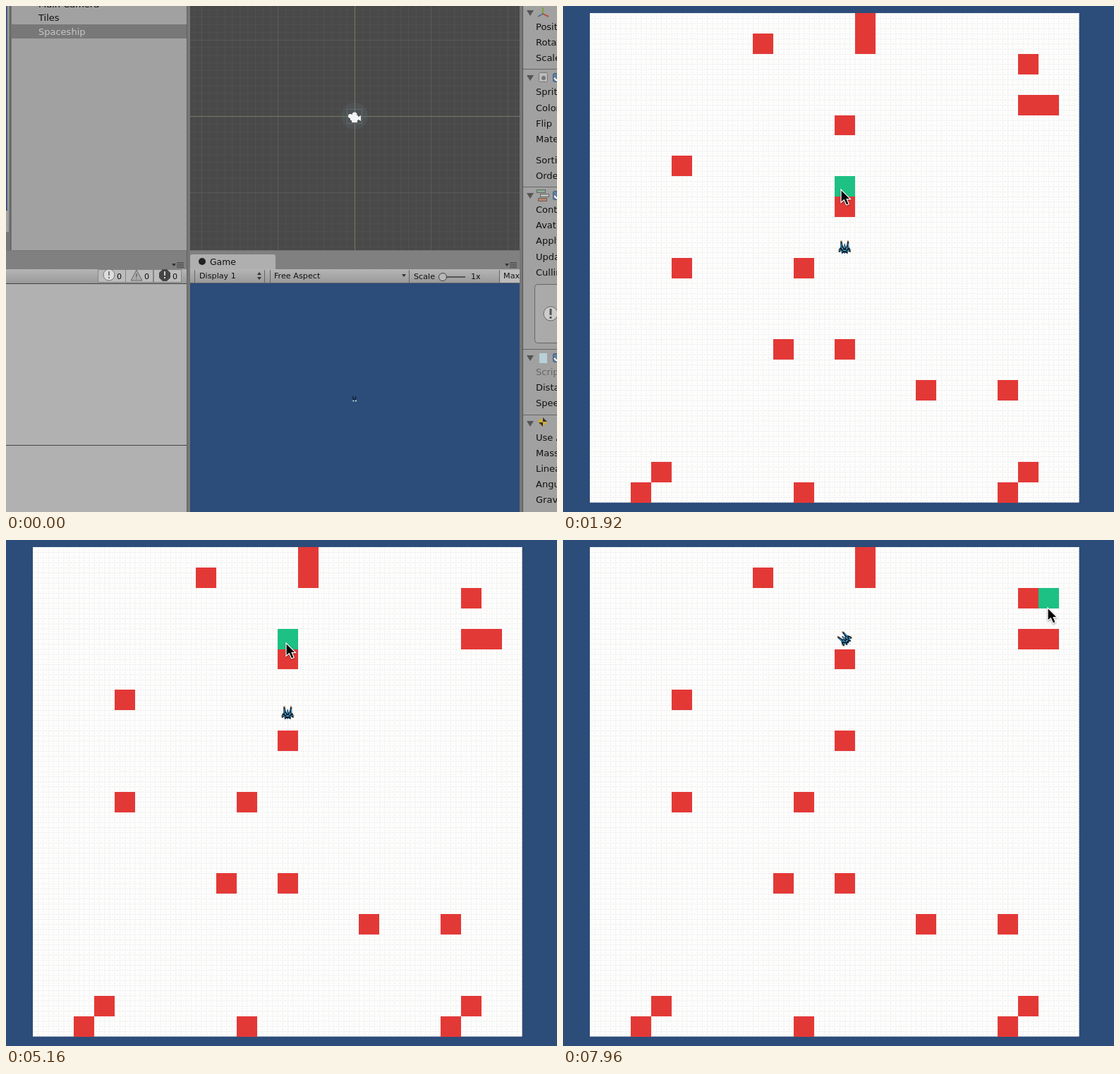
Write an HTML page that moves like this. It is 781 px wide and 717 px high and loops after 8000 ms.

```html
<!DOCTYPE html>
<html lang="en">
<head>
<meta charset="utf-8">
<title>Spaceship on a grid</title>
<style>
html, body { margin: 0; width: 100%; height: 100%; overflow: hidden; background: #2c4c79; }
svg { display: block; width: 781px; height: 717px; }
text { font-family: "DejaVu Sans", sans-serif; font-size: 13px; fill: #111; }
.small { font-size: 11.2px; }
.tab { font-size: 12.4px; }
#board { shape-rendering: crispEdges; }
</style>
</head>
<body>
<svg viewBox="0 0 781 717">
  <defs>
    <linearGradient id="bar" x2="0" y2="1"><stop stop-color="#b5b5b5"/><stop offset="1" stop-color="#999"/></linearGradient>
    <pattern id="boardLines" width="7.22" height="7.22" patternUnits="userSpaceOnUse" x="38" y="10">
      <path d="M0 .5H7.22" stroke="#e6e6f2" stroke-dasharray="2 1.61"/>
      <path d="M.5 0V7.22" stroke="#ecece0" stroke-dasharray="2 1.61"/>
    </pattern>
    <pattern id="sceneLines" width="10.85" height="10.85" patternUnits="userSpaceOnUse" x="494" y="156">
      <path d="M0 .5H10.85M.5 0V10.85" stroke="#505050"/>
    </pattern>
    <g id="shipArt">
      <path d="M-1-3L0-6L1-3L2 0L3-4L4-10L6-9L6-1L9 4L8 7L5 5L4 9L1 7L0 9L-1 7L-4 9L-5 5L-8 7L-9 4L-6-1L-6-9L-4-10L-3-4L-2 0Z" fill="#0b1a2c"/>
      <path d="M-5-6V1M5-6V1M-7 3L-3 6M7 3L3 6" stroke="#2b8fc2" stroke-width="1.5" fill="none"/>
      <path d="M0-3V1M-2 4H2M-3 0V3M3 0V3" stroke="#63bcd8" stroke-width="1.3"/>
      <path d="M-5-10V-8M5-10V-8M-8.500 3V5M8.500 3V5" stroke="#e0a048" stroke-width="1.5"/>
      <path d="M-4 9V11M0 9V12M4 9V11" stroke="#bfeee4"/>
    </g>
  </defs>

  <g id="editor">
    <rect width="781" height="717" fill="#777"/>
    <rect width="4" height="320" fill="#a1a1a1"/>
    <path d="M1 0V290" stroke="#3d5680" stroke-width="2"/>
    <rect x="8" width="248" height="346" fill="#a1a1a1"/>
    <rect x="8" y="26" width="248" height="20" fill="#787878"/>
    <rect y="347" width="256" height="26" fill="#808080"/>
    <rect y="373" width="256" height="20" fill="url(#bar)"/>
    <rect y="393" width="256" height="324" fill="#b1b1b1"/>
    <path d="M0 393.500H256M0 622.500H256" stroke="#444"/>
    <path d="M6.500 0V346M256.500 0V717" stroke="#606060"/>
    <g fill="#bcbcbc" stroke="#858585">
      <rect x="130.500" y="373.500" width="39" height="18"/><rect x="169.500" y="373.500" width="39" height="18"/><rect x="209.500" y="373.500" width="39" height="18"/>
    </g>
    <circle cx="146" cy="381" r="8" fill="#ddd" stroke="#777"/>
    <path d="M177 389L185 374L193 389Z" fill="#aaa" stroke="#666"/>
    <path d="M222 373H228L233 378V385L228 390H222L217 385V378Z" fill="#444"/>
    <path d="M146 376V382M146 384V386M185 379V384M185 386V387" stroke="#777" stroke-width="2"/>
    <path d="M225 376V382M225 384V386" stroke="#ccc" stroke-width="2"/>

    <rect x="261" width="467" height="346" fill="#494949"/>
    <rect x="261" width="467" height="346" fill="url(#sceneLines)"/>
    <path d="M277.500 0V346M385.500 0V346M602.500 0V346M711.500 0V346M261 48.500H728M261 264.500H728" stroke="#585858"/>
    <path d="M494.500 0V346M261 156.500H728" stroke="#777868"/>
    <circle cx="494" cy="156" r="19" fill="#677878" opacity=".2"/>
    <rect x="483.500" y="146.500" width="21" height="20" fill="none" stroke="#5c6b72"/>
    <g fill="#f4f4f4"><circle cx="494" cy="154" r="3.500"/><circle cx="488" cy="156" r="3"/><rect x="488" y="155" width="11" height="7"/><path d="M498 158L503 155V163L498 160ZM490 162H498V165H490Z"/></g>

    <rect x="261" y="347" width="467" height="26" fill="#808080"/>
    <path d="M261 373V355Q261 352 264 352H379Q382 352 382 355V373Z" fill="#afafaf"/>
    <circle cx="278" cy="362" r="5" fill="#222"/>
    <rect x="261" y="373" width="467" height="20" fill="url(#bar)"/>
    <path d="M267.500 374V392M366.500 374V392M374.500 374V392M571.500 374V392M699.500 374V392M261 392.500H728" stroke="#666"/>
    <rect x="700" y="374" width="28" height="18" fill="#bcbcbc"/>
    <path d="M356 381L359 377L362 381ZM356 384H362L359 388ZM561 380H567L564 384ZM235 365H241L238 369ZM707 365H713L710 369Z" fill="#333"/>
    <path d="M242 364H252M242 367H252M242 370H252M714 364H724M714 367H724M714 370H724" stroke="#333"/>
    <path d="M619 384H651" stroke="#555" stroke-width="2"/>
    <circle cx="619" cy="384" r="5.500" fill="#b8b8b8" stroke="#444"/>
    <rect x="261" y="393" width="467" height="324" fill="#2c4c79"/>
    <path d="M492 553V558M495.500 553V558M494 556V559" stroke="#10243c" stroke-width="1.500"/>
    <path d="M491.500 559.500H493.500M495 559.500H497" stroke="#a9dcd8" stroke-width="2"/>

    <rect x="733" width="48" height="717" fill="#a1a1a1"/>
    <path d="M733 89.500H781M733 256.500H781M733 486.500H781M733 579.500H781" stroke="#666"/>
    <path d="M732.500 0V717" stroke="#555"/>
    <g id="arrows" fill="#555"></g>
    <path d="M761 11V2" stroke="#7ca336" stroke-width="2"/><path d="M761 11L754 15" stroke="#4c7396" stroke-width="2"/><path d="M761 11L769 15" stroke="#b74e3c" stroke-width="2"/>
    <rect x="755.500" y="94.500" width="12" height="13" rx="2" fill="#bbb" stroke="#777"/><circle cx="762" cy="102" r="3" fill="#777"/>
    <g stroke="#666"><rect x="752.500" y="260.500" width="12" height="4" fill="#8aa995"/><rect x="757.500" y="266.500" width="12" height="4" fill="#bbb"/><rect x="754.500" y="272.500" width="12" height="4" fill="#bc8265"/></g>
    <rect x="756" y="492" width="11" height="14" fill="#b9d0d8"/>
    <path d="M754 589L760 583V595ZM761 584L767 590L761 595Z" fill="#d9ad28"/><path d="M761 583L767 589H761ZM755 590H761V596Z" fill="#333"/>
    <g fill="#5e7fa5" stroke="#465c75"><rect x="775.500" y="95.500" width="12" height="12" rx="2"/><rect x="775.500" y="262.500" width="12" height="12" rx="2"/><rect x="775.500" y="492.500" width="12" height="12" rx="2"/></g>
    <path d="M777 102L781 106M777 269L781 273M777 499L781 503" stroke="#fff" stroke-width="2"/>
    <rect x="749.500" y="394.500" width="50" height="83" rx="4" fill="#aaa" stroke="#666"/>
    <circle cx="772" cy="436" r="10" fill="#ccc" stroke="#666"/>
    <path d="M772 429V438M772 440V443" stroke="#555" stroke-width="3"/>
    <g id="labels"></g>
  </g>

  <g id="game">
    <rect width="781" height="717" fill="#2c4c79"/>
    <rect x="38" y="10" width="693.500" height="693.500" fill="#fdfdfd"/>
    <rect x="38" y="10" width="693.500" height="693.500" fill="url(#boardLines)"/>
    <g id="board">
      <g id="walls" fill="#e33936"></g>
      <rect id="hover" width="28.900" height="28.900" fill="#1dc184"/>
    </g>
    <use id="ship" href="#shipArt"/>
    <g id="cursor">
      <path d="M0 0V18.500L4.300 14.800L7.700 22L11.200 20.500L8.200 13.600H13.500Z" fill="#050505" stroke="#fff" stroke-width="1.200" style="filter:drop-shadow(0 1px 1px #0006)"/>
    </g>
  </g>
</svg>
<script>
const LOOP = 8000, STEP = 40, CELL = 28.9, LEFT = 38, TOP = 10, SPEED = 80;
const $ = id => document.getElementById(id);

const walls = [[13,0],[13,1],[8,1],[21,2],[21,4],[22,4],[12,5],[4,7],[12,9],
  [4,12],[10,12],[9,16],[12,16],[16,18],[20,18],[3,22],[21,22],[2,23],[10,23],[20,23]];
const corner = ([c, r]) => [LEFT + c * CELL, TOP + r * CELL];
const center = ([c, r]) => corner([c + .5, r + .5]);
$('walls').innerHTML = walls.map(cell => {
  const [x, y] = corner(cell);
  return `<rect x="${x}" y="${y}" width="${CELL}" height="${CELL}"/>`;
}).join('');

const label = (text, x, y, cls = '', fill = '#111') =>
  `<text x="${x}" y="${y}" class="${cls}" style="fill:${fill}">${text}</text>`;
const fields = { Position: 34, Rotation: 56, Scale: 78, Sprite: 126, Color: 149, Flip: 171, Material: 193,
  'Sorting Layer': 223, 'Order in Layer': 245, Controller: 293, Avatar: 315, 'Apply Root Motion': 337,
  'Update Mode': 360, 'Culling Mode': 382, Distance: 545, Speed: 567, 'Use Auto Mass': 616,
  Mass: 638, 'Linear Drag': 660, 'Angular Drag': 682, 'Gravity Scale': 704 };
$('labels').innerHTML = [
  label('Main Camera', 46, 2), label('Tiles', 46, 21), label('Spaceship', 46, 41, '', '#c8c8c8'),
  ...[157, 196, 236].map(x => label('0', x, 387, 'small')),
  label('Game', 289, 367, 'tab'), label('Display 1', 274, 386, 'small'), label('Free Aspect', 380, 386, 'small'),
  label('Scale', 578, 387, 'small'), label('1x', 659, 387, 'small'),
  `<svg x="700" y="373" width="28" height="20">${label('Max', 5, 13, 'small')}</svg>`,
  label('Script', 751, 523, '', '#666'),
  ...Object.entries(fields).map(([name, y]) => label(name, 751, y))
].join('');
$('arrows').innerHTML = [6, 98, 265, 495, 588].map(y => `<path d="M738 ${y}h10l-5 8z"/>`).join('');

// time, x, y of the pointer tip
const pointer = [[40,368,-36],[400,371,-24],[600,376,12],[1350,392,238],[1720,394,260],[1920,394,260],
  [2160,397,258],[3560,397,258],[4160,399,125],[4320,399,125],[4760,397,146],[6880,397,146],
  [7760,684,92],[7920,687,96],[8000,687,96]];
const flights = [
  { start: 2050, cells: [[12,11],[12,10],[13,9],[12,8]] },
  { start: 5030, cells: [[12,8],[12,7],[12,6],[13,5],[12,4]] }
];

function pointerAt(t) {
  const i = Math.max(1, pointer.findIndex(p => p[0] > t));
  const [a, b] = [pointer[i - 1], pointer[i]];
  const u = Math.min(1, Math.max(0, (t - a[0]) / (b[0] - a[0])));
  const e = u * u * (3 - 2 * u);
  return [1, 2].map(k => a[k] + (b[k] - a[k]) * e);
}

function shipAt(t) {
  let pose = [...center([12, 11]), 0];
  for (const { start, cells } of flights) {
    let left = (t - start) / 1000 * SPEED;
    for (let i = 1; i < cells.length && left > 0; i++) {
      const [x, y] = center(cells[i - 1]), [nx, ny] = center(cells[i]);
      const dx = nx - x, dy = ny - y, length = Math.hypot(dx, dy);
      const u = Math.min(1, left / length);
      pose = [x + dx * u, y + dy * u, Math.atan2(dx, -dy) * 180 / Math.PI];
      left -= length;
    }
  }
  return pose;
}

function render(now) {
  const t = Math.floor((now % LOOP) / STEP) * STEP;
  const playing = t >= 40;
  $('editor').style.display = playing ? 'none' : '';
  $('game').style.display = playing ? '' : 'none';

  const [px, py] = pointerAt(t);
  $('cursor').setAttribute('transform', `translate(${px} ${py})`);
  const cell = [Math.floor((px - LEFT) / CELL), Math.floor((py - TOP) / CELL)];
  const blocked = walls.some(([c, r]) => c === cell[0] && r === cell[1]);
  const [hx, hy] = corner(cell);
  $('hover').setAttribute('x', hx);
  $('hover').setAttribute('y', hy);
  $('hover').style.display = t > 600 && !blocked ? '' : 'none';

  const [x, y, angle] = shipAt(t);
  $('ship').setAttribute('transform', `translate(${x} ${y}) rotate(${angle})`);
}

const begin = performance.now();
function tick() {
  render(performance.now() - begin);
  requestAnimationFrame(tick);
}
tick();
</script>
</body>
</html>
```
